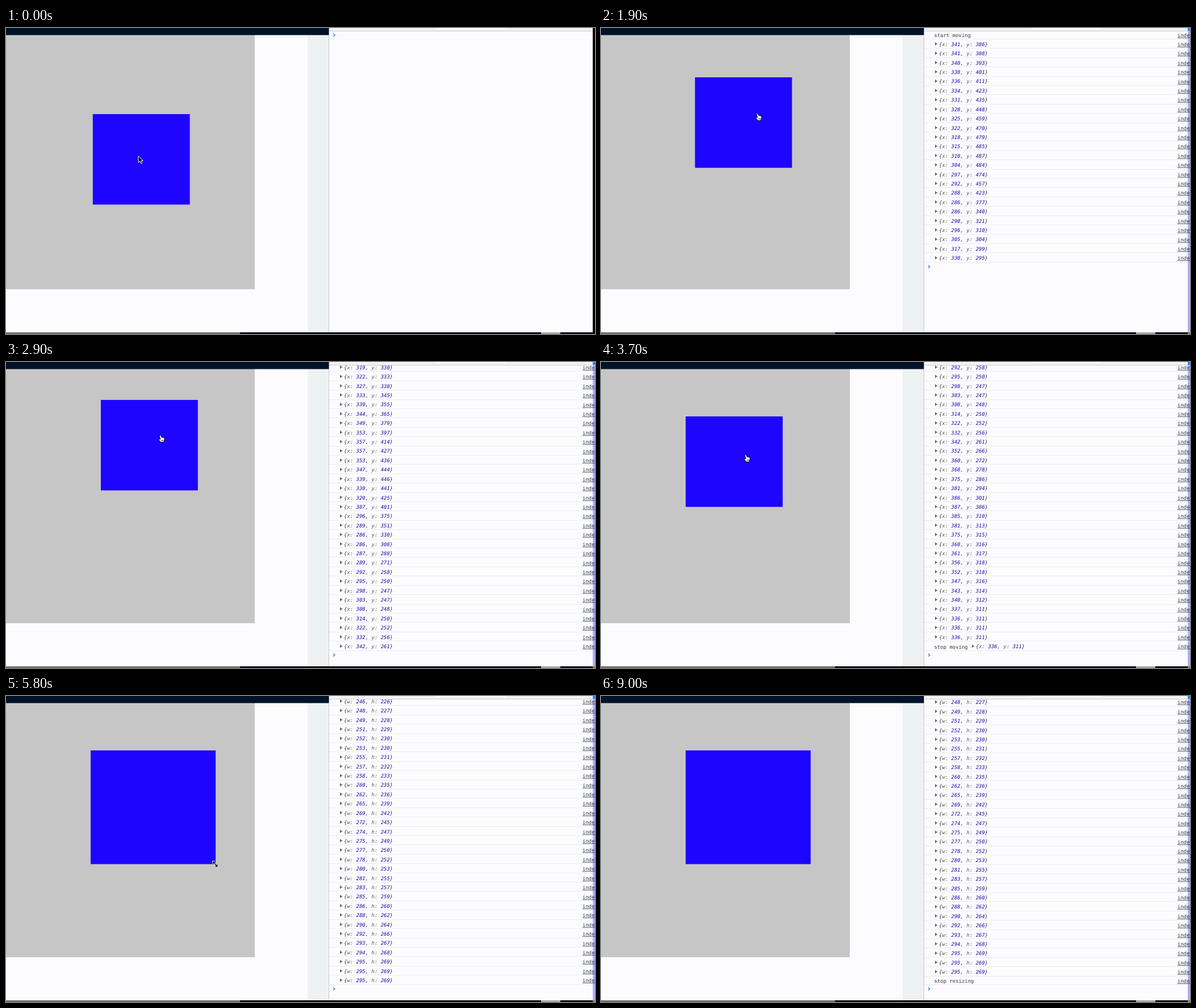
Write an HTML page with a canvas that moves like this. It is 1037 px wide and 540 px high and loops after 9.1 s.

```html
<!DOCTYPE html>
<html lang="en">
<head>
<meta charset="utf-8">
<title>Drag and resize log</title>
<style>
  html, body { margin: 0; width: 100%; height: 100%; overflow: hidden; }
  canvas { display: block; }
</style>
</head>
<body>
<canvas id="stage" width="1037" height="540"></canvas>
<script>
const ctx = document.getElementById('stage').getContext('2d');
const LOOP = 9100, STEP = 100, SCALE = 0.746;
const FONT = '8.95px "DejaVu Sans Mono", monospace';
const CHAR = 5.39;

// Smooth path through [step, a, b] keys, sampled at every whole step and at rest at both ends.
function spline(keys) {
  const slope = (i, k) => {
    const before = keys[i - 1], after = keys[i + 1];
    return before && after ? (after[k] - before[k]) / (after[0] - before[0]) : 0;
  };
  const sample = step => {
    const i = Math.max(0, keys.findIndex(key => key[0] >= step) - 1);
    const from = keys[i], to = keys[i + 1], span = to[0] - from[0];
    const u = (step - from[0]) / span, v = 1 - u;
    return [1, 2].map(k => Math.round(
      v * v * ((1 + 2 * u) * from[k] + u * span * slope(i, k)) +
      u * u * ((1 + 2 * v) * to[k] - v * span * slope(i + 1, k))));
  };
  return Array.from({ length: keys.at(-1)[0] + 1 }, (_, step) => sample(step));
}

// Two loops of the dragged box, then it settles.
const moves = spline([
  [0, 341, 386], [11, 315, 485], [15, 292, 457], [18, 286, 340], [21, 305, 304],
  [25, 358, 299], [30, 425, 360], [34, 397, 452], [38, 360, 474], [41, 327, 433],
  [43, 309, 350], [53, 319, 330], [58, 344, 365], [62, 357, 427], [66, 330, 441],
  [70, 289, 351], [75, 292, 258], [80, 314, 250], [85, 360, 272], [90, 387, 306],
  [96, 356, 318], [101, 337, 311], [104, 336, 311]]);
const sizes = spline([
  [0, 229, 214], [11, 246, 226], [21, 262, 236], [24, 272, 245],
  [30, 281, 255], [37, 293, 267], [41, 295, 269]]);

const moveTime = i => 1505 + i / 0.06;
const sizeTime = i => 4850 + i * 18;
const entry = (time, text, keys, values) =>
  ({ time, text, keys, values, height: values ? 16.41 : 14.9 });
const log = [
  entry(1400, 'start moving'),
  ...moves.map((v, i) => entry(moveTime(i), '', 'xy', v)),
  entry(3500, 'stop moving', 'xy', moves.at(-1)),
  entry(4700, 'start resizing'),
  ...sizes.map((v, i) => entry(sizeTime(i), '', 'wh', v)),
  entry(6300, 'stop resizing')];

// The box runs two steps ahead of what has been logged.
function ahead(list, timeOf, t, extra = 0) {
  const count = list.filter((_, i) => timeOf(i) <= t).length;
  return list[count ? Math.min(list.length - 1, count + 1 + extra) : 0];
}
const place = ([x, y]) => [x * SCALE - 101.6, y * SCALE - 136];

function ease(t, from, to) {
  const u = Math.min(1, Math.max(0, (t - from) / (to - from)));
  return u * u * (3 - 2 * u);
}
const mix = (a, b, u) => a.map((v, k) => v + (b[k] - v) * u);

function rect(color, x, y, w, h) {
  ctx.fillStyle = color;
  ctx.fillRect(x, y, w, h);
}
function write(text, x, y, color, italic) {
  ctx.font = (italic ? 'italic ' : '') + FONT;
  ctx.fillStyle = color;
  ctx.fillText(text, x, y);
}
function strokePath(path, color, width) {
  ctx.strokeStyle = color;
  ctx.lineWidth = width;
  ctx.stroke(path);
}

const arrow = new Path2D('M-4-7V4.5L-1.3 2 .6 6.3 2.6 5.4.8 1.3H4.3Z');
const hand = new Path2D('M-4-5.5Q-2.6-7.4-1.3-5.4L.2-2.2 1.8-2.5 3.2-1.9 4.6-1.4 5.2.2 4.8 3.2 3.6 6.3H-1.6L-4.6 2.2Q-5.4.4-3.6.5L-2.2 1.2Z');
const knuckles = new Path2D('M-.2 2V4.6M1.5 2V4.6M3.1 2V4.6');
const diagonal = new Path2D('M-3.2-3.6 3.2 3.6M-3.6-.8V-4H-.4M3.6.8V4H.4');
const grip = new Path2D('M-8-3-3-8M-5-3-3-5');
const marker = new Path2D('M0-3 4.5 0 0 3Z');
const prompt = new Path2D('M0-2.5 3 0 0 2.5');

function at(x, y, draw) {
  ctx.save();
  ctx.translate(x, y);
  draw();
  ctx.restore();
}

function drawCursor(kind, [x, y]) {
  at(x, y, () => {
    if (kind === 'resize') {
      strokePath(diagonal, '#fff', 3.2);
      strokePath(diagonal, '#000', 1.5);
    } else if (kind === 'hand') {
      ctx.fillStyle = '#fff';
      ctx.fill(hand);
      strokePath(hand, '#000', 1);
      strokePath(knuckles, '#000', 0.7);
    } else {
      ctx.fillStyle = '#000';
      ctx.fill(arrow);
      strokePath(arrow, '#fff', 1);
    }
  });
}

function drawPage() {
  rect('#fcfcff', 0, 0, 1037, 540);
  rect('#c6c6c6', 0, 12, 438, 449);
  rect('#eff2f3', 531, 12, 37, 525);
}

function drawFrame(t) {
  rect('#f3f3f5', 568, 0, 465, 5);
  rect('#fff', 757, 0, 123, 2);
  rect('#ccccd0', 568, 5, 465, 1);
  rect('#c8c8cc', 568, 0, 1, 537);
  rect('#001228', 0, 0, 568.5, 12.5);
  rect('#05070f', 0, 537, 1037, 3);
  rect('#70706a', 0, 537, 412, 3);
  rect('#a8a8a8', 942, 537, 34, 3);
  if (t < 100) {
    rect('#000', 1033, 0, 4, 540);
  } else {
    rect('#b0acff', 1033, 5, 4, 532);
    rect('#1e90ff', 1033, 0, 4, 5);
    rect('#a87428', 1033, 537, 4, 3);
  }
}

function drawObject(x, bottom, { keys, values }) {
  at(x, bottom - 8.2, () => {
    ctx.fillStyle = '#6e6e6e';
    ctx.fill(marker);
  });
  const put = (text, column, color) =>
    write(text, x + 7 + column * CHAR, bottom - 4.5, color, true);
  put('{', 0, '#303942');
  put(keys[0] + ':', 1, '#565656');
  put(values[0], 4, '#1c00b0');
  put(',', 7, '#303942');
  put(keys[1] + ':', 9, '#565656');
  put(values[1], 12, '#1c00b0');
  put('}', 15, '#303942');
}

function drawLog(t) {
  const shown = log.filter(e => e.time <= t);
  const total = shown.reduce((sum, e) => sum + e.height, 0);
  let bottom = Math.min(5 + total, 509.6);
  at(576, bottom + 7.5, () => strokePath(prompt, '#2a78e4', 1.3));

  ctx.save();
  ctx.beginPath();
  ctx.rect(569, 6, 468, 531);
  ctx.clip();
  for (const e of shown.reverse()) {
    if (bottom < 5) break;
    rect('#eaeaf4', 569, Math.round(bottom) - 1, 464, 1);
    const base = bottom - (e.values ? 4.4 : 3.5);
    if (e.text) write(e.text, 586.5, base + (e.values ? 0.5 : 0), '#303942');
    if (e.values) drawObject(e.text ? 653 : 588, bottom, e);
    write('inde', 1015, base, '#303942');
    rect('#303942', 1015, Math.round(base + 1), 22, 0.8);
    bottom -= e.height;
  }
  ctx.restore();
}

function drawBox(t) {
  const [x, y] = place(ahead(moves, moveTime, t));
  const [w, h] = ahead(sizes, sizeTime, t).map(v => v * SCALE);
  rect('#1d05ff', x, y, w, h);
  at(x + w, y + h, () => strokePath(grip, '#14067a', 0.9));

  // While dragging, the pointer leads the box by one more step.
  const [px, py] = place(ahead(moves, moveTime, t, 1));
  const held = [px + 101, py + 64], corner = [x + w - 1, y + h];
  if (t < 1600) {
    drawCursor(t < 300 ? 'arrow' : 'hand', mix([237, 233], [249, 221], ease(t, 200, 1200)));
  } else if (t < 4700) {
    drawCursor(t < 4400 ? 'hand' : 'resize', mix(held, corner, ease(t, 3500, 4500)));
  } else if (t < 8800) {
    const leave = ease(t, 8000, 8700);
    drawCursor(leave > 0.03 ? 'arrow' : 'resize', mix(corner, [430, 560], leave));
  }
}

const start = performance.now();
function render() {
  const elapsed = (performance.now() - start) % LOOP;
  const t = Math.floor(elapsed / STEP) * STEP;
  ctx.textRendering = 'geometricPrecision';
  drawPage();
  drawBox(t);
  drawFrame(t);
  drawLog(t);
  requestAnimationFrame(render);
}
render();
</script>
</body>
</html>
```
